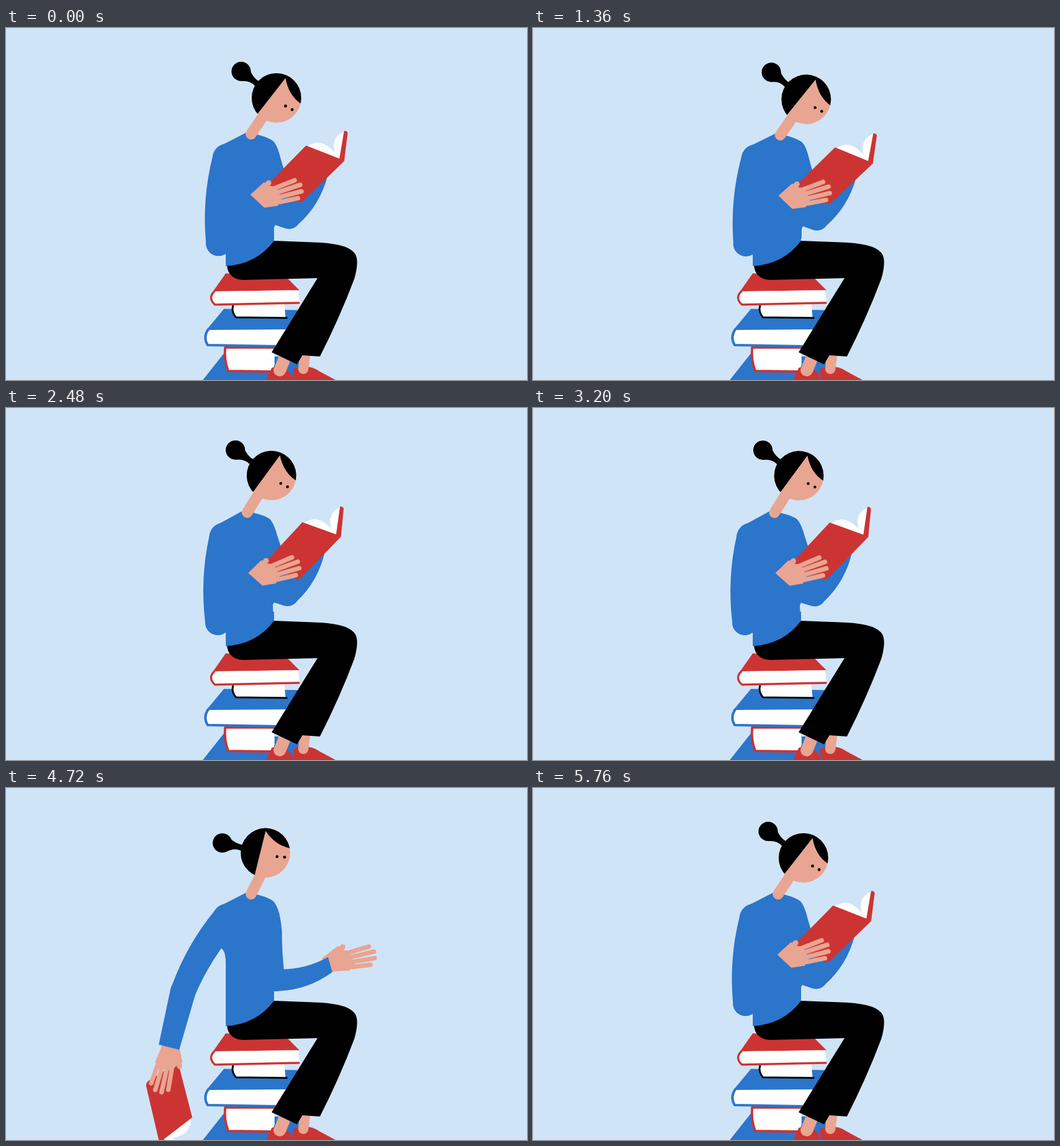
Recreate the animation shown at these times as an HTML page with a canvas. Size 863 by 584 pixels, loop 5840 ms.

```html
<!DOCTYPE html>
<html lang="en">
<head>
<meta charset="utf-8">
<title>Reader on a stack of books</title>
<style>
  html, body { margin: 0; height: 100%; overflow: hidden; background: #d0e4f7; }
  canvas { display: block; }
</style>
</head>
<body>
<canvas width="863" height="584"></canvas>
<script>
const ctx = document.querySelector('canvas').getContext('2d');
const BLUE = '#2b75cb', RED = '#cc3433', SKIN = '#e8a591', SKY = '#d0e4f7';
const LOOP = 5840, STEP = 80, START = 4400, RELEASE = 4960, AWAY = 5220, CATCH = 5600;
const RAD = Math.PI / 180;

// Poses: near wrist x, y, angle; far wrist x, y, angle; head tilt
const READ = [417, 288, -22, 522, 238, -50, 0];
const LOW = [270, 430, 99, 537, 293, -17, -24];
const BACK = [165, 290, 175, 566, 285, -20, -35];
const OPEN = [406, 296, -14, 555, 282, -33, -33];
const poses = [[START, READ], [4720, LOW], [RELEASE, BACK], [5360, OPEN], [CATCH, READ]];
const lean = [[0, [0]], [1360, [.92]], [2720, [-1.89]], [START, [0]]];

const smooth = u => u * u * (3 - 2 * u);

function at(track, t, ease = u => u) {
  const i = track.findIndex(key => key[0] > t);
  if (i < 1) return track.at(i)[1];
  const [t0, a] = track[i - 1], [t1, b] = track[i];
  const u = ease((t - t0) / (t1 - t0));
  return a.map((v, k) => v + (b[k] - v) * u);
}

function fill(color, d) {
  ctx.fillStyle = color;
  ctx.fill(new Path2D(d));
}

function line(color, width, d) {
  ctx.strokeStyle = color;
  ctx.lineWidth = width;
  ctx.lineCap = ctx.lineJoin = 'round';
  ctx.stroke(new Path2D(d));
}

function disc(color, x, y, r) {
  ctx.fillStyle = color;
  ctx.beginPath();
  ctx.arc(x, y, r, 0, 7);
  ctx.fill();
}

// Draws with the point (ox, oy) moved to (x, y) and turned
function placed(x, y, degrees, ox, oy, draw) {
  ctx.save();
  ctx.translate(x, y);
  ctx.rotate(degrees * RAD);
  ctx.translate(-ox, -oy);
  draw();
  ctx.restore();
}

// Elbow of an arm with the given upper and lower lengths
function elbow(sx, sy, wx, wy, upper, lower) {
  const d = Math.hypot(wx - sx, wy - sy);
  const cos = (upper * upper + d * d - lower * lower) / (2 * upper * d);
  const a = Math.atan2(wy - sy, wx - sx) + Math.acos(Math.min(1, cos));
  return [sx + upper * Math.cos(a), sy + upper * Math.sin(a)];
}

// Tapered, bent sleeve: round at the first joint, cut flat at the second
function limb(x1, y1, r1, x2, y2, r2, bend = 0) {
  const len = Math.hypot(x2 - x1, y2 - y1);
  const nx = (y1 - y2) / len, ny = (x2 - x1) / len;
  const r = (r1 + r2) / 2, mx = (x1 + x2) / 2 + nx * bend, my = (y1 + y2) / 2 + ny * bend;
  disc(BLUE, x1, y1, r1);
  fill(BLUE, `M${x1 - nx * r1} ${y1 - ny * r1}Q${mx - nx * r} ${my - ny * r} ${x2 - nx * r2} ${y2 - ny * r2}
    L${x2 + nx * r2} ${y2 + ny * r2}Q${mx + nx * r} ${my + ny * r} ${x1 + nx * r1} ${y1 + ny * r1}Z`);
}

function drawStack() {
  fill(BLUE, 'M360 541L326 584H490V545H445V560Z');
  fill('#fff', 'M364 530H444V569H368Q362 550 364 530Z');
  line(RED, 4, 'M446 530L363 530Q361 550 368 569L442 570');

  fill(BLUE, 'M361 466L484 468L463 501L332 501Z');
  fill('#fff', 'M335 501L466 500L448 527L334 526Q328 512 335 501Z');
  line(BLUE, 4, 'M335 500Q326 513 334 526L445 528');

  fill('#fff', 'M377 459L461 457L463 480H381Q374 470 377 459Z');
  line('#000', 3, 'M376 461Q373 471 381 480L465 481');

  fill(RED, 'M364 407L466 415L486 435L343 437Z');
  fill('#fff', 'M345 437L484 435L486 455L346 459Q336 447 345 437Z');
  line(RED, 3.5, 'M345 437Q334 448 346 459L485 456');
}

function drawLegs() {
  fill(RED, 'M431 584L440 564Q455 555 474 575L476 584ZM477 584L475 566Q500 556 520 570L546 584Z');
  fill(SKIN, 'M452 544L443 567Q443 577 454 578Q462 577 465 567L471 552ZM486 542L484 566Q485 574 493 574Q500 573 501 566L504 543Z');
  fill('#000', 'M366 394L444 353L521 356Q570 359 579 376Q585 388 577 416Q553 480 520 545L491 543L482 558L440 538L516 415L392 418Q368 416 366 394Z');
}

function drawHand() {
  const polar = (r, a) => `${417 + r * Math.cos(a * RAD)} ${288 + r * Math.sin(a * RAD)}`;
  fill(SKIN, 'M402 279L427 256L438 262L447 263L457 285L450 295L429 298L420 300Z');
  line(SKIN, 9, 'M428 265L435 257');
  for (let i = 0; i < 4; i++) {
    line(SKIN, 7.5, `M${polar(37, 13 * i - 38)}L${polar(76 - 3.2 * (i - 1.3) ** 2, 8.4 * i - 30)}`);
  }
}

// turn runs from 0 to 1 while a page goes over
function drawBook(turn) {
  fill('#fff', 'M499 197Q521 180 545 207Q537 182 560 172L556 220Z');
  if (turn > 0 && turn < 1) {
    const a = Math.PI * (.14 + .72 * turn);
    const x = 530 + 35 * Math.cos(a), y = 196 - 25 * Math.sin(a);
    const foot = 53 * smooth(Math.min(1, turn * 1.6));
    fill('#fff', `M${553 - foot} ${216 - foot * .38}L${x} ${y}Q${x + 18} ${y + 4} 545 194L552 217Z`);
  }
  fill(RED, 'M560 171Q564 170 566 174L560 222L552 218Z');
  fill(RED, 'M497 195L553 217L559 222L491 288Q485 291 478 286L436 265Q433 261 437 256Z');
}

function drawHead() {
  disc(SKIN, 448, 116, 41);
  ctx.save();
  ctx.beginPath();
  ctx.arc(448, 116, 41, 0, 7);
  ctx.clip();
  fill('#000', 'M417 142L463 83Q468 112 489 126H520V50H390V150Z');
  ctx.restore();
  disc('#000', 389.5, 72, 16);
  fill('#000', 'M401 61Q407 82 420 89L412 96Q405 87 390 88Z');
  disc('#000', 463, 129.5, 2.4);
  disc('#000', 474, 135.5, 2.4);
}

// Thrown off to the left, then dropping in from above
function bookInAir(t) {
  const k = (t - RELEASE) / 240, left = (CATCH - t) / 240;
  return t < AWAY
    ? [165 - 200 * k, 290 - 130 * k, 175 + 75 * k]
    : [417 + 141 * left, 288 - 455 * left, 133 * left - 22];
}

function drawUpperBody(t) {
  const [wx, wy, handAngle, vx, vy, farAngle, tilt] = at(poses, t);
  const [ex, ey] = elbow(366, 216, wx, wy, 142, 95);
  const [fx, fy] = elbow(438, 212, vx, vy, 107, 93);
  const airborne = t > RELEASE && t < CATCH;
  const [bx, by, bookAngle] = airborne ? bookInAir(t) : [wx, wy, handAngle];

  if (t > START && t < CATCH) placed(vx, vy, farAngle + 22, 417, 288, drawHand);
  limb(438, 212, 15, fx, fy, 14);
  limb(440, 306, 18, fx, fy, 19);
  limb(fx, fy, 19, vx, vy, 13, 14);

  fill(BLUE, 'M397 174L360 193L348 202L342 216L352 264Q364 266 364 290V375L444 347V331L458 300L457 238Q454 200 443 188Q436 182 417 177Z');
  limb(366, 216, 24, ex, ey, 21, 12);

  placed(bx, by, bookAngle + 22, 417, 288, () => drawBook((t - 3600) / 400));
  placed(wx, wy, handAngle + 22, 417, 288, drawHand);
  limb(ex, ey, 21, wx, wy, 17.5);

  const hx = 448 + .76 * tilt, hy = 116 + .35 * tilt;
  const cos = Math.cos(tilt * RAD), sin = Math.sin(tilt * RAD);
  line(SKIN, 18, `M406 176L${hx - 22 * cos - 30 * sin} ${hy - 22 * sin + 30 * cos}`);
  placed(hx, hy, tilt, 448, 116, drawHead);
}

function frame(now) {
  const t = Math.floor(now % LOOP / STEP) * STEP;
  fill(SKY, 'M0 0H863V584H0Z');
  drawStack();
  drawLegs();
  fill(BLUE, 'M364 355V395Q415 392 444 353V338H364Z');
  placed(306, 400, at(lean, t, smooth)[0], 306, 400, () => drawUpperBody(t));
  requestAnimationFrame(frame);
}

requestAnimationFrame(frame);
</script>
</body>
</html>
```
